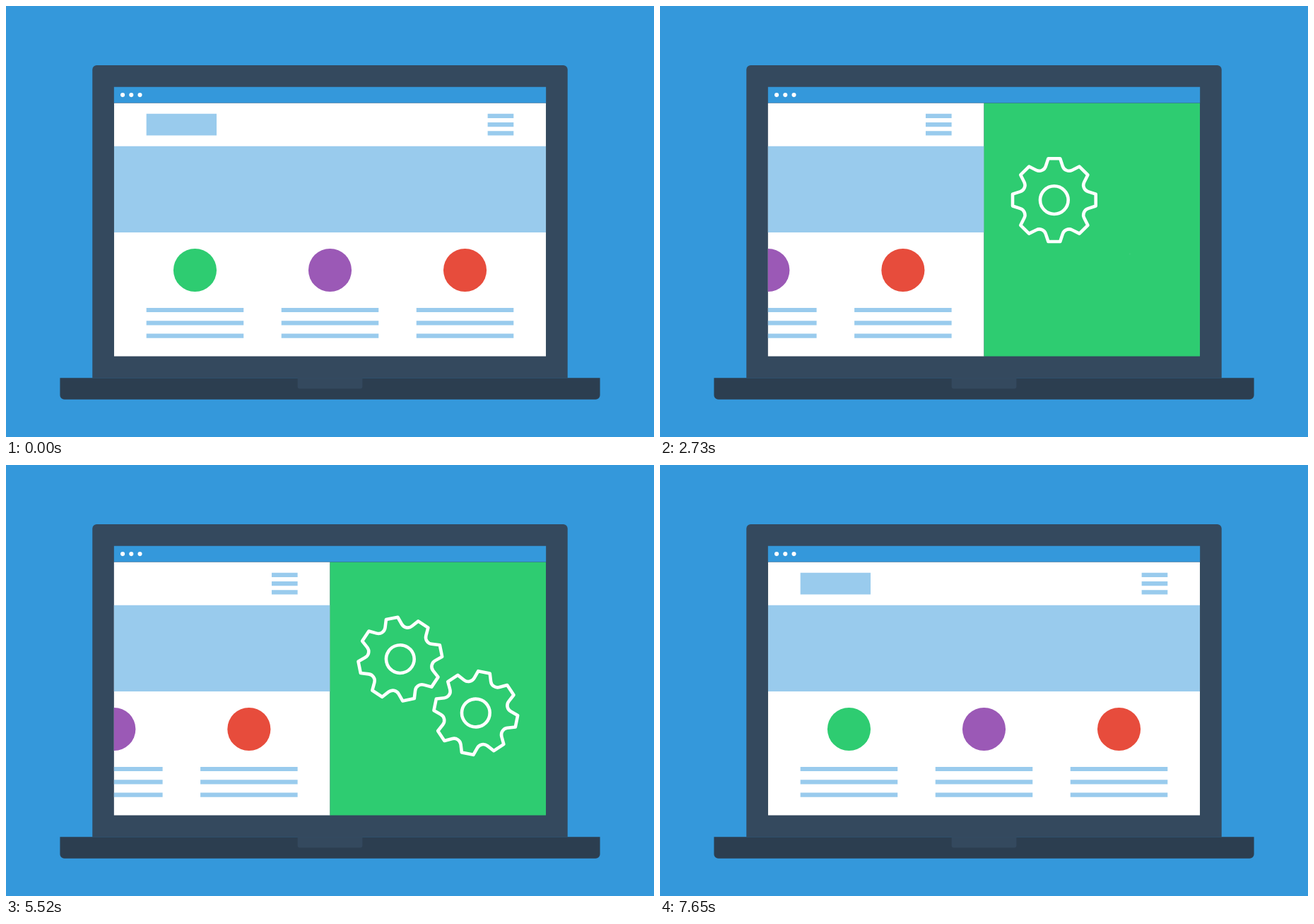
These frames come from a looping animation (917x611 px, 8.13 s). An HTML page with a canvas:

```html
<!DOCTYPE html>
<html lang="en">
<head>
<meta charset="utf-8">
<title>Laptop with gears</title>
<style>
html, body { margin: 0; width: 100%; height: 100%; overflow: hidden; background: #3498db; }
canvas { display: block; }
</style>
</head>
<body>
<canvas id="stage" width="917" height="611"></canvas>
<script>
const ctx = document.getElementById('stage').getContext('2d');
const LOOP = 8130, SCALE = 917 / 1200;
const BLUE = '#3498db', PALE = '#99cbed', SLATE = '#34495e', NAVY = '#2c3e50', GREEN = '#2ecc71';

// Eased progress from 0 to 1 between two times
function ease(t, from, to) {
  const x = Math.min(1, Math.max(0, (t - from) / (to - from)));
  return x * x * (3 - 2 * x);
}

function rect(color, x, y, w, h, radii = 0) {
  ctx.fillStyle = color;
  ctx.beginPath();
  ctx.roundRect(x, y, w, h, radii);
  ctx.fill();
}

function disc(color, x, y, r) {
  ctx.fillStyle = color;
  ctx.beginPath();
  ctx.arc(x, y, r, 0, 2 * Math.PI);
  ctx.fill();
}

function bars(x, y, w, step) {
  for (let i = 0; i < 3; i++) rect(PALE, x, y + i * step, w, 8);
}

function polar(r, a) {
  return [r * Math.sin(a), -r * Math.cos(a)];
}

const gearPath = new Path2D();
for (let i = 0; i < 8; i++) {
  const a = i * Math.PI / 4, half = Math.atan(11 / 77), r = Math.hypot(11, 77);
  const left = polar(r, a - half), right = polar(r, a + half);
  gearPath.lineTo(...left);
  gearPath.lineTo(...right);
  gearPath.arcTo(...polar(53, a + Math.PI / 8), ...polar(r, a + Math.PI / 4 - half), 12.5);
}
gearPath.closePath();
gearPath.moveTo(26, 0);
gearPath.arc(0, 0, 26, 0, 2 * Math.PI);

function gear(x, y, size, angle) {
  if (size <= 0) return;
  ctx.save();
  ctx.translate(x, y);
  ctx.scale(size, size);
  ctx.rotate(angle);
  ctx.strokeStyle = '#fff';
  ctx.lineWidth = 6;
  ctx.lineJoin = 'round';
  ctx.stroke(gearPath);
  ctx.restore();
}

// Grows slightly too large, then settles
function pop(t, start) {
  return 1.05 * ease(t, start, start + 450) - 0.05 * ease(t, start + 450, start + 600);
}

function laptop() {
  rect(BLUE, 0, 0, 1200, 800);
  rect(SLATE, 160, 110, 880, 580, [8, 8, 0, 0]);
  rect(NAVY, 100, 690, 1000, 40, [0, 0, 8, 8]);
  rect(SLATE, 540, 690, 120, 20, [0, 0, 4, 4]);
  rect(BLUE, 200, 150, 800, 30);
  for (const x of [216, 232, 248]) disc('#fff', x, 165, 4);
}

function page() {
  rect('#fff', 200, 180, 800, 470);
  rect(PALE, 260, 200, 130, 40);
  bars(892, 200, 48, 16);
  rect(PALE, 200, 260, 800, 160);
  [GREEN, '#9b59b6', '#e74c3c'].forEach((color, i) => {
    disc(color, 350 + i * 250, 490, 40);
    bars(260 + i * 250, 560, 180, 24);
  });
}

function draw(t) {
  ctx.setTransform(SCALE, 0, 0, SCALE, 0, 0);
  laptop();
  const slide = 400 * (ease(t, 1350, 1800) - ease(t, 7200, 7650));
  const turn = Math.PI * ease(t, 3530, 7200);
  ctx.save();
  ctx.beginPath();
  ctx.rect(200, 180, 800, 470);
  ctx.clip();
  ctx.translate(-slide, 0);
  page();
  if (slide > 0) {
    rect(GREEN, 1000, 180, 400, 470);
    gear(1130, 360, pop(t, 1800), -turn);
    gear(1270, 460, pop(t, 2700), turn);
  }
  ctx.restore();
}

const start = performance.now();
function tick() {
  draw((performance.now() - start) % LOOP);
  requestAnimationFrame(tick);
}
tick();
</script>
</body>
</html>
```
